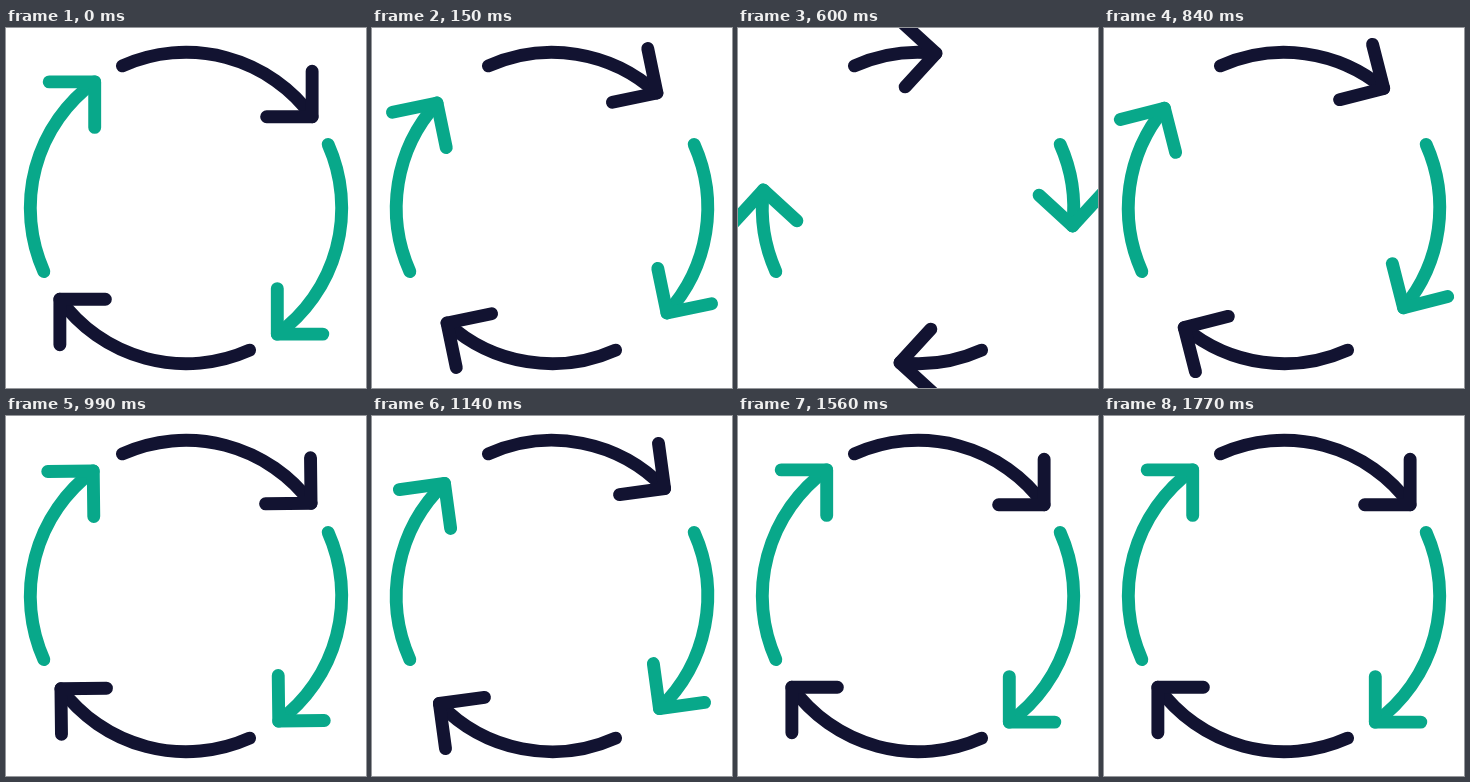
Recreate the animation shown at these times as an HTML page with a canvas. Size 360 px wide and 360 px high, loop 1.84 s.

```html
<!DOCTYPE html>
<html lang="en">
<head>
<meta charset="utf-8">
<title>Circling arrows</title>
<style>
html, body { margin: 0; width: 100%; height: 100%; overflow: hidden; background: #fff; }
canvas { display: block; width: 360px; height: 360px; }
</style>
</head>
<body>
<canvas id="stage" width="360" height="360"></canvas>
<script>
const ctx = document.getElementById('stage').getContext('2d');
const LOOP = 1840, STEP = 30, LAST = 1770;
const RADIUS = 155.7, ARM = 45.5;
const NAVY = '#121331', GREEN = '#08a88a';
const rad = deg => deg * Math.PI / 180;

const TAIL = -114.1, TIP = -35.9;
// [time in ms, degrees the tip is pulled back]
const KEYS = [[0, 0], [483, 53.3], [1029, 0], [1200, 10.7], [1425, 0], [LOOP, 0]];

function pullBack(t) {
  const i = KEYS.findIndex(k => t < k[0]);
  const [t0, a] = KEYS[i - 1], [t1, b] = KEYS[i];
  const ease = (1 - Math.cos(Math.PI * (t - t0) / (t1 - t0))) / 2;
  return a + (b - a) * ease;
}

function drawArrow(turn, color, tip) {
  ctx.save();
  ctx.translate(180, 180);
  ctx.rotate(rad(turn));
  ctx.strokeStyle = color;

  ctx.beginPath();
  ctx.arc(0, 0, RADIUS, rad(TAIL), rad(tip));
  ctx.stroke();

  // The head turns rigidly about the circle's centre
  ctx.rotate(rad(tip));
  ctx.translate(RADIUS, 0);
  ctx.rotate(rad(-TIP));
  ctx.beginPath();
  ctx.moveTo(-ARM, 0);
  ctx.lineTo(0, 0);
  ctx.lineTo(0, -ARM);
  ctx.stroke();
  ctx.restore();
}

function draw(now) {
  const t = Math.min(LAST, Math.floor((now % LOOP) / STEP) * STEP);
  const tip = TIP - pullBack(t);
  ctx.fillStyle = '#fff';
  ctx.fillRect(0, 0, 360, 360);
  ctx.lineWidth = 12.9;
  ctx.lineCap = ctx.lineJoin = 'round';
  for (let i = 0; i < 4; i++) drawArrow(i * 90, i % 2 ? GREEN : NAVY, tip);
}

const start = performance.now();
function tick() {
  draw(performance.now() - start);
  requestAnimationFrame(tick);
}
tick();
</script>
</body>
</html>
```
